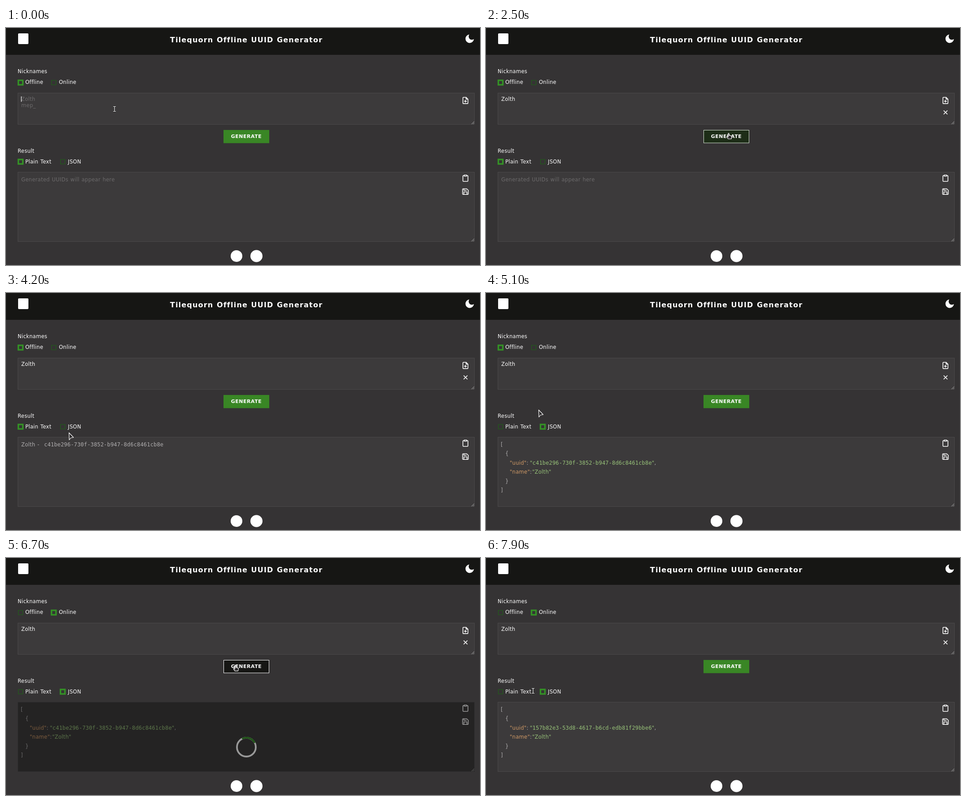
Recreate the animation shown at these times as an HTML page. Size 1057 by 530 pixels, loop 8000 ms.

```html
<!DOCTYPE html>
<html lang="en">
<head>
<meta charset="utf-8">
<title>Offline UUID Generator</title>
<style>
html, body { margin: 0; width: 100%; height: 100%; overflow: hidden; background: #353334; }
svg { display: block; }
text { font: 11.5px "DejaVu Sans", sans-serif; letter-spacing: .3px; word-spacing: .7px; fill: #fff; white-space: pre; }
.title { font: bold 16px "DejaVu Sans", sans-serif; letter-spacing: 1.2px; text-anchor: middle; }
.action { font: bold 11px "DejaVu Sans", sans-serif; letter-spacing: .5px; text-anchor: middle; }
.mono { font: 12px "DejaVu Sans Mono", monospace; letter-spacing: .17px; }
.hint text { fill: #6c6a6b; }
.output text { fill: #b0aeaf; }
.output .key { fill: #d19a66; }
.output .value { fill: #98c379; }
.area { fill: #3c3a3b; stroke: #4b494a; }
.grip { stroke: #aaa; fill: none; }
.icon { fill: none; stroke: #fff; stroke-width: 2.2; stroke-linecap: round; stroke-linejoin: round; }
.radio { fill: #353334; stroke: #1d6514; }
.radio.on { stroke: #349226; stroke-width: 3.4; }
.pointer path { fill: #2b292a; stroke: #fff; stroke-width: 1.2; stroke-linejoin: round; }
</style>
</head>
<body>
<svg width="1057" height="530" viewBox="0 0 1057 530">
  <rect width="1057" height="530" fill="#353334"/>
  <rect width="1057" height="60" fill="#161614"/>
  <rect x="27" y="12" width="23" height="24" rx="2" fill="#fff"/>
  <text class="title" x="536" y="32">Tilequorn Offline UUID Generator</text>
  <path transform="translate(1021.4 11.4) scale(1.05)" fill="#fff" d="M21 12.8A9 9 0 1 1 11.2 3 7 7 0 0 0 21 12.8z"/>

  <text x="26" y="101">Nicknames</text>
  <text x="43" y="125">Offline</text>
  <text x="118" y="125">Online</text>
  <rect class="area" x="26.5" y="145.5" width="1018" height="70"/>
  <path class="grip" d="M1038 215l6 -6m-3 6l3 -3"/>
  <g id="nameHint" class="hint"><text x="34" y="163">Zolth</text><text x="34" y="177">mep_</text></g>
  <text id="typed" x="34" y="163"></text>
  <rect id="caret" y="153" width="1.2" height="12" fill="#fff"/>
  <g class="icon" transform="translate(1016 153.5) scale(.71)">
    <path d="M14 2H6a2 2 0 0 0-2 2v16a2 2 0 0 0 2 2h12a2 2 0 0 0 2-2V8zV8h6M12 18v-6m-3 3l3-3 3 3"/>
  </g>
  <path id="clear" class="icon" style="stroke-width:1.7" d="M1021 185l7.5 7.5m0 -7.5l-7.5 7.5"/>

  <rect id="button" x="485.5" y="228.5" width="101" height="28.5"/>
  <text class="action" x="536" y="246.3">GENERATE</text>

  <text x="26" y="279">Result</text>
  <text x="43" y="303">Plain Text</text>
  <text x="138" y="303">JSON</text>
  <rect class="area" x="26.5" y="322.5" width="1018" height="155"/>
  <path class="grip" d="M1038 477l6 -6m-3 6l3 -3"/>
  <g id="resultHint" class="hint"><text x="34" y="343">Generated UUIDs will appear here</text></g>
  <g id="plain" class="output">
    <text x="34" y="343">Zolth - <tspan id="plainId" class="mono" x="85"></tspan></text>
  </g>
  <g id="json" class="output">
    <text x="33" y="343">[</text>
    <text x="43" y="363">{</text>
    <text x="53" y="384"><tspan class="key">"uuid"</tspan>:<tspan class="value" x="98">"<tspan id="jsonId" class="mono"></tspan>"</tspan>,</text>
    <text x="53" y="404"><tspan class="key">"name"</tspan>:<tspan class="value" x="103">"Zolth"</tspan></text>
    <text x="43" y="425">}</text>
    <text x="33" y="445">]</text>
  </g>
  <g class="icon" transform="translate(1016 327.3) scale(.71)">
    <path d="M16 4h2a2 2 0 0 1 2 2v14a2 2 0 0 1-2 2H6a2 2 0 0 1-2-2V6a2 2 0 0 1 2-2h2M9 2h6a1 1 0 0 1 1 1v2a1 1 0 0 1-1 1H9a1 1 0 0 1-1-1V3a1 1 0 0 1 1-1z"/>
  </g>
  <g class="icon" transform="translate(1016 357.3) scale(.71)">
    <path d="M19 21H5a2 2 0 0 1-2-2V5a2 2 0 0 1 2-2h11l5 5v11a2 2 0 0 1-2 2zM17 21v-8H7v8M7 3v5h8"/>
  </g>
  <g id="loading">
    <rect x="26" y="322" width="1019" height="156" fill="#000" opacity=".4"/>
    <g fill="none" stroke-width="3.8">
      <circle cx="536" cy="423" r="21" stroke="#999"/>
      <path id="spinner" d="M521.15 408.15A21 21 0 0 1 550.85 408.15" stroke="#1f5417"/>
    </g>
  </g>

  <circle cx="514" cy="510" r="13" fill="#fff"/>
  <circle cx="558.5" cy="510" r="13.5" fill="#fff"/>

  <rect id="offline" class="radio" width="10" height="10" x="27.5" y="117"/>
  <rect id="online" class="radio" width="10" height="10" x="101.5" y="117"/>
  <rect id="asPlain" class="radio" width="10" height="10" x="27.5" y="294"/>
  <rect id="asJson" class="radio" width="10" height="10" x="121.5" y="294"/>

  <g id="pointer" class="pointer">
    <path id="arrow" d="M.5 .5L1 16.5L4.5 12L10.5 11Z"/>
    <path id="hand" d="M-1 6V1Q0 -.5 1 1V5L6 6.2Q7.2 6.8 7 9L6 13H-1L-4 8.5Q-4 7 -2.5 7.5L-1 9Z"/>
    <g id="beam" fill="none">
      <path d="M-3 -5.5H3M0 -5.5V5.5M-3 5.5H3" style="stroke:#222;stroke-width:3"/>
      <path d="M-3 -5.5H3M0 -5.5V5.5M-3 5.5H3"/>
    </g>
  </g>
</svg>
<script>
const LOOP = 8000, STEP = 100;
const NAME = "Zolth";
const OFFLINE_ID = "c41be296-730f-3852-b947-8d6c8461cb8e";
const ONLINE_ID = "157b82e3-53d8-4617-b6cd-edb81f29bbe6";
const KEY_TIMES = [1300, 1400, 1600, 1600, 1700];
const HOVERS = [[2350, 3300], [6150, 6950]];

// time, x, y, shape used from that time on
const PATH = [
  [0, 242, 181, "beam"], [2200, 242, 181, "beam"], [2300, 380, 213, "arrow"],
  [2400, 500, 231, "hand"], [2500, 541, 235, "hand"], [3100, 540, 238, "hand"],
  [3300, 470, 262, "arrow"], [3400, 270, 339, "beam"], [3900, 215, 336, "beam"],
  [4200, 140, 312, "arrow"], [4300, 126, 299, "hand"], [4900, 126, 299, "hand"],
  [5000, 122, 282, "arrow"], [5100, 117, 261, "arrow"], [5400, 112, 160, "arrow"],
  [5500, 112, 130, "hand"], [5800, 109, 122, "hand"], [5900, 150, 150, "arrow"],
  [6150, 490, 236, "hand"], [6500, 512, 239, "hand"], [6800, 511, 240, "hand"],
  [6950, 470, 258, "arrow"], [7400, 340, 269, "arrow"], [7700, 180, 288, "arrow"],
  [7900, 105, 297, "beam"], [8000, 105, 297, "beam"]
];

const $ = id => document.getElementById(id);
const show = (id, on) => $(id).style.display = on ? "" : "none";
const check = (id, on) => $(id).classList.toggle("on", on);
const between = (t, a, b) => t >= a && t < b;
const lerp = (a, b, p) => a + (b - a) * p;
const ease = p => 1 - Math.pow(1 - Math.min(1, Math.max(0, p)), 2.3);
const mix = (a, b, p) => `rgb(${a.map((v, i) => Math.round(lerp(v, b[i], p)))})`;

function drawPointer(t) {
  const i = PATH.findIndex(k => k[0] > t) - 1;
  const [t0, x0, y0, shape] = PATH[i], [t1, x1, y1] = PATH[i + 1];
  const p = (t - t0) / (t1 - t0);
  $("pointer").setAttribute("transform", `translate(${lerp(x0, x1, p)} ${lerp(y0, y1, p)})`);
  for (const id of ["arrow", "hand", "beam"]) show(id, id === shape);
  show("pointer", !between(t, 1300, 2200));
}

function drawButton(t) {
  const hover = HOVERS.reduce((sum, [a, b]) => sum + ease((t - a) / 300) - ease((t - b) / 300), 0);
  $("button").setAttribute("fill", mix([57, 134, 37], [22, 22, 20], hover));
  $("button").setAttribute("stroke", mix([57, 134, 37], [255, 255, 255], hover));
}

function draw(t) {
  const typed = NAME.slice(0, KEY_TIMES.filter(k => k <= t).length);
  $("typed").textContent = typed;
  show("nameHint", !typed);
  show("clear", typed);
  show("caret", t < 400 || between(t, 1000, 2200));
  $("caret").setAttribute("x", 33.6 + (typed && $("typed").getComputedTextLength()));

  const json = t >= 4500, online = t >= 5800;
  check("offline", !online);
  check("online", online);
  check("asPlain", !json);
  check("asJson", json);
  show("resultHint", t < 3100);
  show("plain", t >= 3100 && !json);
  show("json", json);
  $("plainId").textContent = OFFLINE_ID;
  $("jsonId").textContent = t < 7500 ? OFFLINE_ID : ONLINE_ID;

  show("loading", between(t, 6700, 7500));
  $("spinner").setAttribute("transform", `rotate(${(t - 6650) * .36} 536 423)`);
  drawButton(t);
  drawPointer(t);
}

const start = performance.now();
function tick() {
  const t = (performance.now() - start) % LOOP;
  draw(Math.floor(t / STEP) * STEP);
  requestAnimationFrame(tick);
}
tick();
</script>
</body>
</html>
```
